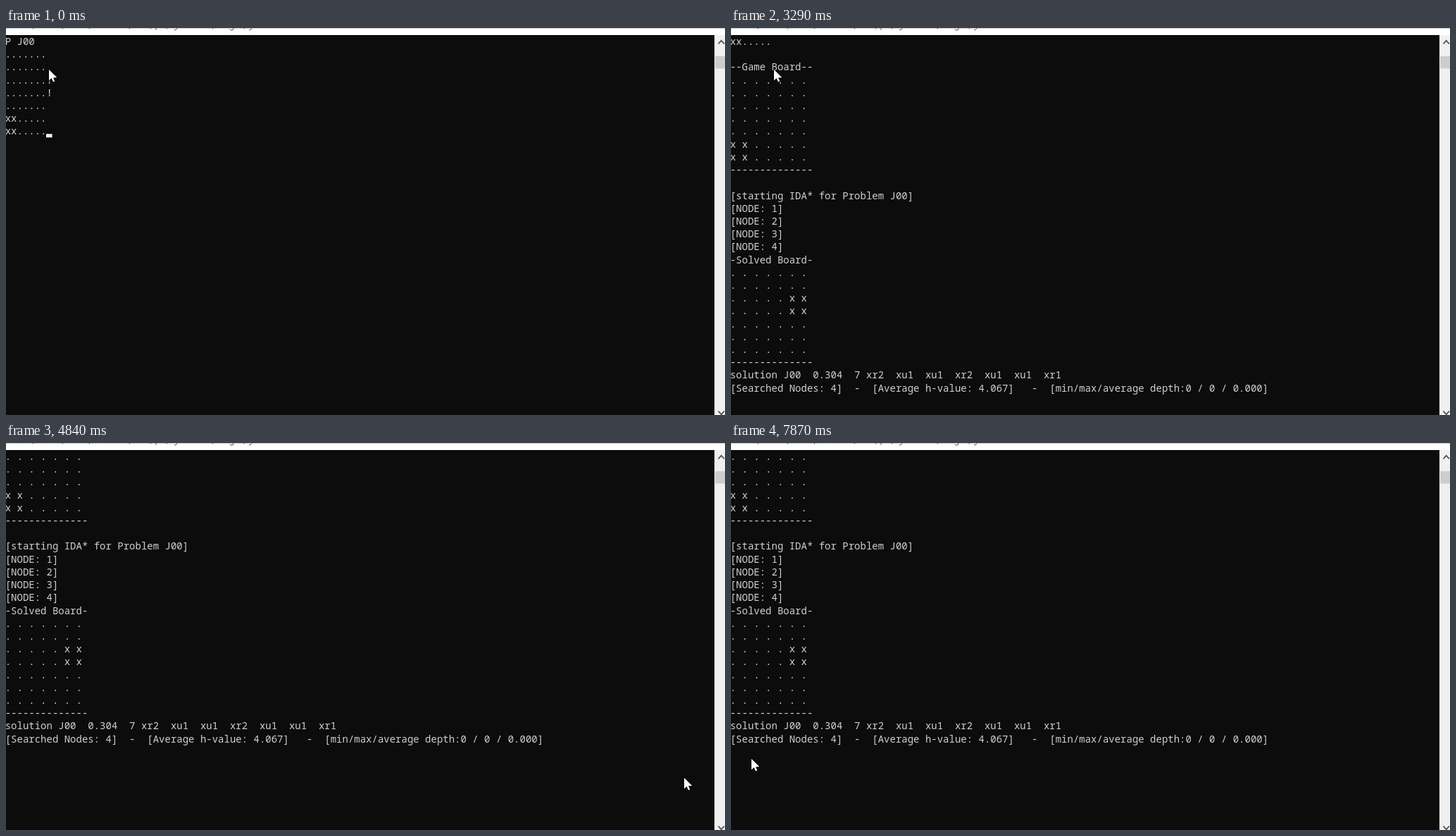
Recreate the animation shown at these times as an HTML page with a canvas. Size 1021 by 549 pixels, loop 8000 ms.

```html
<!DOCTYPE html>
<html lang="en">
<head>
<meta charset="utf-8">
<title>Board solver in a terminal</title>
<style>
  html, body { margin: 0; width: 100%; height: 100%; overflow: hidden; background: #0c0c0c; }
  canvas { display: block; width: 1021px; height: 549px; }
</style>
</head>
<body>
<canvas id="stage" width="1021" height="549"></canvas>
<script>
const ctx = document.getElementById('stage').getContext('2d');
const LOOP = 8000;
const LEFT = -1.3, TOP = 10, CELL = 8.4, ROW = 18.21, BASE = 14;

// Terminal output
const empty = '.......';
const rows = (n, s = empty) => Array(n).fill(s);
const spaced = list => list.map(s => [...s].join(' '));
const rule = '-'.repeat(14);
const lines = [
  'P J00',
  ...rows(2), ...rows(2, empty + '!'), ...rows(1), ...rows(2, 'xx.....'),
  '',
  '--Game Board--',
  ...spaced([...rows(5), ...rows(2, 'xx.....')]),
  rule,
  '',
  '[starting IDA* for Problem J00]',
  ...[1, 2, 3, 4].map(n => `[NODE: ${n}]`),
  '-Solved Board-',
  ...spaced([...rows(2), ...rows(2, '.....xx'), ...rows(3)]),
  rule,
  'solution J00  0.304  7 xr2  xu1  xu1  xr2  xu1  xu1  xr1',
  '[Searched Nodes: 4]  -  [Average h-value: 4.067]   -  [min/max/average depth:0 / 0 / 0.000]'
];

// Screen states: start, first line, line count, caret [column, row]
const screens = [
  { t: 0, first: 0, count: 8, caret: [7, 7] },
  { t: 430, first: 0, count: 8 },
  { t: 860, first: 0, count: 8, caret: [7, 7] },
  { t: 1420, first: 0, count: 18, caret: [0, 18] },
  { t: 1630, first: 0, count: 23, caret: [0, 23] },
  { t: 1750, first: 6, count: lines.length },
  { t: 3290, first: 7, count: lines.length },
  { t: 3600, first: 10, count: lines.length },
  { t: 3720, first: 12, count: lines.length }
];

// Pointer moves, sampled at a low rate like a screen recording
const moves = [{ t: 0, x: 61, y: 59 }];
const ease = k => k * k * (3 - 2 * k);
for (let i = 0; i < 7; i++) {
  const k = ease((i + 1) / 7);
  moves.push({ t: 4190 + i * 108.3, x: 61 + 902 * k, y: 59 + 416 * k });
}
moves.push({ t: 5060, hidden: true });
function glide(start, step, points, down) {
  points.forEach(([x, y], i) => moves.push({ t: start + i * step, x, y, down }));
}
glide(5850, 120, [[338, 2], [190, 176]], false);
glide(6090, 108, [[88, 297], [62, 302], [53, 306], [66, 310], [78, 312], [84.5, 312]], true);
glide(6750, 100, [[91, 309], [84.5, 312]], true);
glide(6960, 110, [[101, 301], [115, 288.5], [109.5, 298]], true);
glide(7420, 112.5, [[103, 318], [86, 358], [62, 402], [39, 436], [29, 448]], false);

const at = (list, t) => {
  let now = list[0];
  for (const item of list) if (item.t <= t + 0.5) now = item;
  return now;
};

function path(points, close) {
  ctx.beginPath();
  points.forEach(([x, y]) => ctx.lineTo(x, y));
  if (close) ctx.closePath();
}

function box(color, x, y, w, h) {
  ctx.fillStyle = color;
  ctx.fillRect(x, y, w, h);
}

function drawScreen({ first, count, caret }) {
  box('#0c0c0c', 0, 0, 1021, 549);
  ctx.font = '14px "Noto Sans Mono", "DejaVu Sans Mono", monospace';
  ctx.textBaseline = 'alphabetic';
  ctx.fillStyle = '#d0d0d0';
  lines.slice(first, count).forEach((s, i) => {
    ctx.fillText(s, LEFT, TOP + BASE + i * ROW);
  });
  if (caret) box('#f2f2f2', LEFT + caret[0] * CELL - 0.5, TOP + (caret[1] + 1) * ROW - 5.4, 8.6, 5);
}

function drawChrome() {
  box('#fff', 0, 0, 1021, 10);
  box('#c8c8c8', 0, 0, 1021, 1);
  // Lower ends of the cut-off title text
  ctx.strokeStyle = '#555';
  ctx.lineWidth = 1;
  for (const x of [38, 80, 118, 175, 205, 228, 293, 338]) {
    path([[x, 0], [x + 0.8, 1.6]]);
    ctx.stroke();
  }
  path([[213, 0], [213, 3]]);
  ctx.stroke();
  for (const x of [240, 346]) {
    path([[x + 3, 0], [x + 1.5, 2.5], [x - 1, 3]]);
    ctx.stroke();
  }
  path([[318, 1.5], [319, 3], [322, 3], [323, 0]]);
  ctx.stroke();

  box('#f0f0f0', 1006, 10, 15, 539);
  box('#cdcdcd', 1007, 40, 14, 17.5);
  ctx.strokeStyle = '#505050';
  ctx.lineWidth = 1.8;
  path([[1011.5, 22.5], [1015.7, 17.8], [1020, 22.5]]);
  ctx.stroke();
  path([[1011.5, 543.5], [1015.7, 548.2], [1020, 543.5]]);
  ctx.stroke();
}

const arrow = [[0, 0], [0, 15.5], [3.6, 12.3], [6, 17.4], [8.3, 16.4], [6.1, 11.5], [11.4, 11.3]];

function drawPointer({ x, y, down, hidden }) {
  if (hidden) return;
  if (down) {
    ctx.fillStyle = 'rgba(255,255,0,0.5)';
    ctx.beginPath();
    ctx.arc(x - 0.5, y - 1, 12.4, 0, Math.PI * 2);
    ctx.fill();
  }
  ctx.save();
  ctx.translate(x, y);
  path(arrow, true);
  ctx.strokeStyle = '#000';
  ctx.lineWidth = 1.6;
  ctx.stroke();
  ctx.fillStyle = '#fff';
  ctx.fill();
  ctx.restore();
}

const begin = performance.now();
function draw() {
  const t = (performance.now() - begin) % LOOP;
  drawScreen(at(screens, t));
  drawChrome();
  drawPointer(at(moves, t));
  requestAnimationFrame(draw);
}
draw();
</script>
</body>
</html>
```
